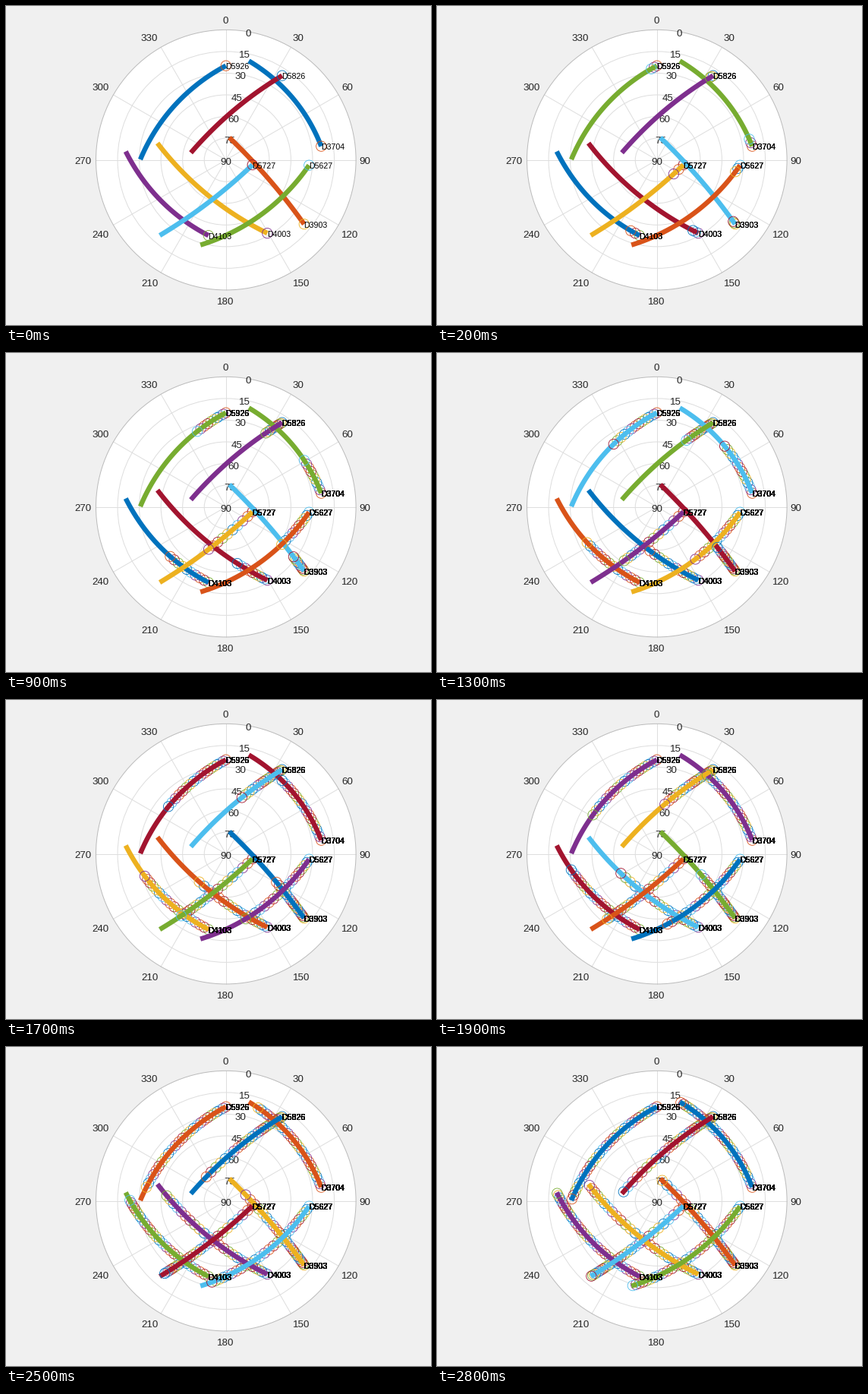
A matplotlib script for the animation above (2900 ms loop, 560 by 420 pixels).

```python
import numpy as np
import matplotlib.pyplot as plt
from matplotlib.animation import FuncAnimation
from matplotlib.patches import Circle

W, H, DPI = 560, 420, 100
PT = 72 / DPI                      # points per pixel
CX, CY, R = 289.8, 202.65, 171.3
FRAMES, STEP_MS = 29, 100
ORBIT = 1.086                      # orbit radius in Earth radii
COLORS = np.array(["#0072BD", "#D95319", "#EDB120", "#7E2F8E",
                   "#77AC30", "#4DBEEE", "#A2142F"])

# First and last point of each pass, in pixels from the zenith
PASSES = {
    "D3704": ((125.5, -18), (31.5, -129.5)),
    "D3903": ((103, 84.5), (7, -27)),
    "D4003": ((54.5, 96.5), (-89, -20.5)),
    "D4103": ((-23, 99.5), (-131.5, -10)),
    "D5627": ((109.5, 7), (-32, 111.5)),
    "D5727": ((35, 6.5), (-86.5, 99)),
    "D5826": ((74, -111), (-44, -12)),
    "D5926": ((0, -124), (-112, -2.5)),
}

plt.rcParams["font.family"] = "Liberation Sans"
fig = plt.figure(figsize=(W / DPI, H / DPI), dpi=DPI, facecolor="#F0F0F0")
ax = fig.add_axes([0, 0, 1, 1])
ax.set_xlim(0, W)
ax.set_ylim(H, 0)
ax.axis("off")


def label(x, y, text, px, color, ha="center", zorder=3):
    """Text whose digits are centred vertically on y."""
    return ax.text(x, y + 0.35 * px, text, fontsize=px * PT, color=color,
                   ha=ha, va="baseline", zorder=zorder)


def ring(radius, **style):
    ax.add_patch(Circle((CX, CY), radius, **style))


def draw_sky_grid():
    ring(R, fc="white", ec="none", zorder=0)
    for j in range(1, 6):
        ring(R * j / 6, fill=False, ec="#DEDEDE", lw=PT, zorder=1)
    for deg in range(0, 360, 30):
        s, c = np.sin(np.radians(deg)), -np.cos(np.radians(deg))
        ax.plot([CX, CX + R * s], [CY, CY + R * c], color="#DEDEDE",
                lw=PT, zorder=1)
        sx, sy = np.sign(np.round([s, c], 6))
        half = 3.7 * len(str(deg)) + 1
        label(CX - 0.8 + 175.5 * s + half * sx,
              CY + 0.5 + 175.5 * c + 9.5 * sy, str(deg), 13.33, "#262626")
    ring(R, fill=False, ec="#BCBCBC", lw=PT, zorder=2)
    for j in range(7):
        label(CX - 0.3 + 4.95 * j, CY + 1.35 - 28.05 * j, str(90 - 15 * j),
              13.33, "#262626")


def to_orbit(point):
    """Unit vector from the Earth's centre to a satellite seen on the chart."""
    r = np.hypot(*point)
    zenith = r / R * np.pi / 2
    psi = zenith - np.arcsin(np.sin(zenith) / ORBIT)
    return np.array([*(np.sin(psi) * np.array(point) / r), np.cos(psi)])


def locate(name, t):
    """Chart position at time t, moving evenly along the orbit's great circle."""
    a, b = map(to_orbit, PASSES[name])
    arc = np.arccos(a @ b)
    t = np.atleast_1d(t)[:, None]
    sat = (np.sin((1 - t) * arc) * a + np.sin(t * arc) * b) / np.sin(arc)
    x, y, z = (ORBIT * sat - [0, 0, 1]).T
    flat = np.hypot(x, y)
    r = np.arctan2(flat, z) / (np.pi / 2) * R
    return CX + r * x / flat, CY + r * y / flat


def circles(zorder):
    return ax.scatter([], [], s=(13.3 * PT) ** 2, facecolors="none",
                      linewidths=0.6, zorder=zorder)


draw_sky_grid()
last = FRAMES - 1
count = len(PASSES)
span = np.linspace(0, 1.014, 90)
tracks = [ax.plot(*locate(name, span), lw=6.4 * PT, zorder=5,
                  solid_capstyle="butt")[0] for name in PASSES]
trail, heads = circles(4), circles(6)

# All satellite positions, ordered by step and then by satellite
steps = np.arange(FRAMES) / last
spots = np.array([locate(name, steps) for name in PASSES])
spots = spots.transpose(2, 0, 1).reshape(-1, 2)
step, sat = np.divmod(np.arange(FRAMES * count), count)
track_colors = COLORS[(2 * step + sat) % 7]
spot_colors = COLORS[(2 * step + sat + 1) % 7]

# Names are printed again at every step, so their edges grow heavier
names = [[label(x - 0.3, y + 0.7, name, 10.67, "black", "left", 7)
          for name, (x, y) in zip(PASSES, spots)] for _ in range(FRAMES)]


def show_circles(group, part):
    group.set_offsets(spots[part])
    group.set_edgecolors(list(spot_colors[part]))


def update(k):
    now = slice(k * count, (k + 1) * count)
    show_circles(trail, slice(0, k * count))
    show_circles(heads, now)
    for line, color in zip(tracks, track_colors[now]):
        line.set_color(color)
    for j, layer in enumerate(names):
        for text in layer:
            text.set_visible(j <= k)
    return []


anim = FuncAnimation(fig, update, frames=FRAMES, interval=STEP_MS,
                     repeat=True, repeat_delay=0, blit=False)
plt.show()
```
